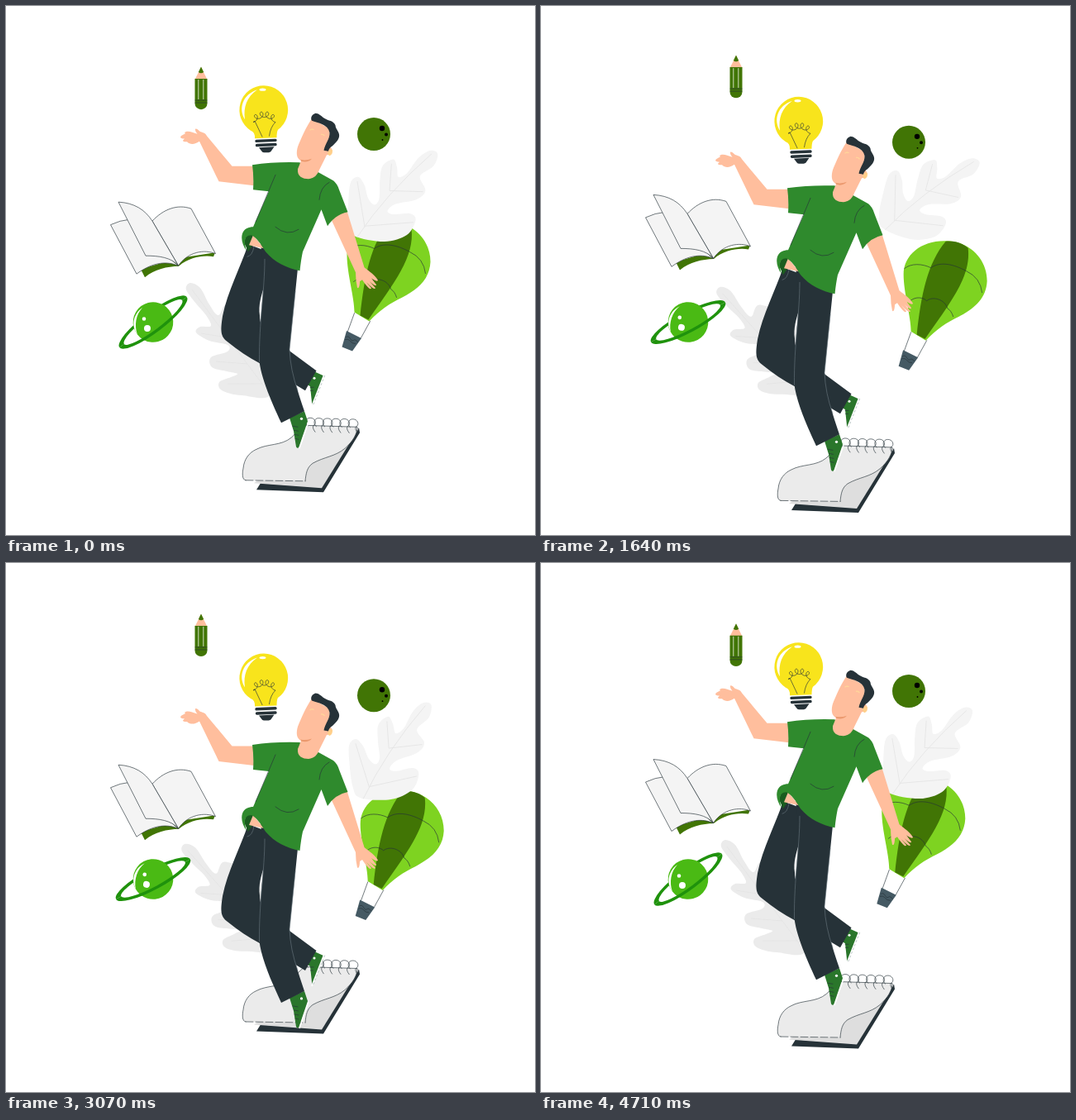
Animation of 640 by 640 pixels, one loop 4.78 s. Source, as an HTML page:

```html
<!DOCTYPE html>
<html lang="en">
<head>
<meta charset="utf-8">
<title>Floating ideas</title>
<style>
html, body { margin: 0; width: 100%; height: 100%; overflow: hidden; background: #fff; }
svg { display: block; width: 100vw; height: 100vh; }
.ln { fill: none; stroke: #263238; stroke-width: .65; stroke-linecap: round; stroke-linejoin: round; }
.pg { fill: #f4f4f4; stroke: #263238; stroke-width: .65; stroke-linejoin: round; }
.ink { fill: #263238; }
.skin { fill: #ffbe9d; }
.moss { fill: #417505; }
.shirt { fill: #2f8a2d; }
.shoe { fill: #2a762b; }
.ring { fill: #1f920c; }
.vein { fill: none; stroke: #e4e4e4; stroke-width: .8; }
.w { fill: #fff; }
</style>
</head>
<body>
<svg viewBox="0 0 640 640">
  <g id="leafL">
    <path id="leafLShape" fill="#ebebeb"/>
    <path class="vein" d="M225 343L312 460M268 457H310M236 396L268 401M254 430L292 433"/>
  </g>

  <g id="balloon">
    <path fill="#7ed321" d="M433 320C433 296 455 279 483 279.500C511 279 534 300 534 328C533 349 519 361 500 371C485 378 472 387 460 400L442 389C442 371 433 342 433 320Z"/>
    <path class="moss" d="M484 280C497 279 505 283 511 288C515 322 491 352 459 398L449 393C454 345 462 306 484 280Z"/>
    <path class="ln" d="M434 313C442 306 456 307 466 312C480 302 500 311 509 316Q526 324 528 342M441 352C448 346 457 348 461 352C468 346 483 350 486 361Q491 364 493 371M442 390L434 412M461 400L450 420"/>
    <path fill="#455a64" d="M432.500 411.500L450.500 420.500L439.500 436L427 431Z"/>
    <path class="ln" d="M432 419q3 -2 5 2t4 2t5 2M431 422q4 -1 6 2t6 3"/>
  </g>

  <g id="leafR">
    <path id="leafRShape" fill="#f4f4f4"/>
    <path class="vein" d="M418 273Q460 226 522 186M429 262L428 206M465 223L472 191M430 261L488 265M465 223L505 230"/>
  </g>

  <g id="pad">
    <path class="ink" d="M427 510L428 516L384 588L303 585L308 577L380 582Z"/>
    <path fill="#dedede" d="M425 509L426 512L382 583L300 577L310 570L360 540Z"/>
    <path fill="#ebebeb" d="M290 573.500C285 573 286 564 287 559C288 548 294 540 303 536C316 529 333 532 345 522L361 507L425 509C425 517 420 526 410 535C398 545 385 545 371 553C364 558 363 565 362 575Z"/>
    <path class="ln" d="M362 574.500C363 565 364 558 371 553C385 545 398 545 410 535C420 526 425 517 425 509L361 507L345 522C333 532 316 529 303 536C294 540 288 548 287 559C286 564 285 573 290 573.500"/>
    <path class="ln" stroke-dasharray="9 3" d="M290 573.500L362 574.500"/>
    <path class="ln" id="coil"/>
  </g>

  <g id="planet">
    <path class="ring" d="M-51 0A51 12.500 0 0 1 51 0H44A44 9 0 0 0 -44 0Z"/>
    <circle r="24.300" fill="#4aba14"/>
    <path class="ring" d="M-51 0A51 12.500 0 0 0 51 0H44A44 9 0 0 1 -44 0Z"/>
    <g class="w" transform="rotate(37)">
      <path d="M-13 -17.500C-24 -10 -27 4 -19 15C-23 4 -21 -9 -13 -17.500Z"/>
      <circle cx="-11" cy="-4" r="2.300"/>
      <circle cx="-7" cy="7.500" r="4"/>
    </g>
  </g>

  <g id="book">
    <path class="moss" d="M163 318L168 328C180 318 195 315 209 314.500C222 304 238 301 251 303L253 298L208 305Z"/>
    <path class="pg" d="M126.500 264.500Q138 259 150 258L208 314C192 307 174 312 158 324Z"/>
    <path class="pg" d="M177 260C190 246 207 239 224 245L253.500 299.500C240 294 220 297 208.500 314Z"/>
    <path class="pg" d="M136 237C155 238 168 246 177 260L208.500 314C200 304 185 302 169 302Z"/>
  </g>

  <g id="pencil">
    <path class="skin" d="M236 74L243.500 89H228.500Z"/>
    <path class="moss" d="M236 73.500L239.200 80Q236 82.500 232.800 80Z"/>
    <path class="moss" d="M228.500 88H243.500V118A7.500 7.200 0 0 1 228.500 118Z"/>
    <path d="M232.800 89V113M238.800 89V113" stroke="#dfe8d5" stroke-width=".9"/>
    <path class="ln" d="M229 114H243M229 117H243"/>
  </g>

  <g id="bulb">
    <path fill="#f8e41c" d="M312 96A29.600 29.600 0 0 1 329 149.500Q327.500 152 327.500 159L301 160Q301.500 152 296 150.500A29.600 29.600 0 0 1 312 96Z"/>
    <path class="w" d="M304 101C286 107 281 124 289 137C287 122 291 110 304 101Z"/>
    <ellipse class="w" cx="310.500" cy="101" rx="4" ry="1.700"/>
    <path class="ln" id="wire"/>
    <path d="M303 163.200L326 162.200M303.500 168.400L326 167.400" stroke="#263238" stroke-width="3.400" stroke-linecap="round"/>
    <path class="ink" d="M306 171L324.500 170L321 175Q320 177 316 177H312Q310 177 309 175Z"/>
  </g>

  <g id="ball">
    <circle class="moss" cx="445" cy="155" r="20"/>
    <circle cx="455" cy="148" r="3.200"/><circle cx="460" cy="155.500" r="2"/><circle cx="455.500" cy="162" r=".9"/>
  </g>

  <g id="man">
    <path class="shoe" d="M373 442L384 447L370.500 484L368 460L362 456Z"/>
    <path d="M384.500 447L370 484" stroke="#fff" stroke-width="1.800"/>
    <path class="ln" stroke-dasharray="2 3" style="stroke:#9aa" d="M385.500 447L371 484"/>
    <circle class="w" cx="373" cy="450" r="1.500"/>
    <path class="ln" d="M368 461h4M368.500 465h3"/>
    <path class="ink" d="M293 288C284 315 268 345 262 375C259 394 260 400 268 406C280 416 294 425 307 432L362 465L375.500 441L343 417C320 410 307 392 307 374C305 362 309 350 312 340L325 300Z"/>
    <path class="shoe" d="M343 498L361 490L365 502L354.500 533Q353 536 351 533L348 514Z"/>
    <path d="M366 503L355 535" stroke="#fff" stroke-width="1.500"/>
    <circle class="w" cx="357.500" cy="499" r="1.600"/>
    <path class="ln" d="M347 508l6 1M348.500 513l5 1M349 518l5 1M350 523l4 1"/>
    <path class="ink" d="M308 288L353 317L343 415C344 440 353 466 361 490L333 504C320 476 306 444 306 422C306 385 312 350 312 320Z"/>
    <path class="ln" style="stroke:#66757c" d="M313 306C313 345 306 380 306.500 430M350 345L343 415Q344 440 353 465M300 291Q298 302 292 303"/>
    <path class="skin" d="M299 193.500H273.500L243 157C241 152 236 153 234 151C232 148.500 229 147 228.800 149Q229 152 231.500 154.500C225 153 220 149.500 216 153L217 154L212 156.800Q209 160 216 160.300L214 162.500Q214 164 219 164C223 168 229 167 234 163.500L257.500 212L300 217Z"/>
    <path class="skin" d="M393 257C398 250 406 247 413 249L433.500 316C440 321 447 326 450 331.500C449 334 445 331 442 329L448 337C448 339 445 338 439 332L447 341C446 343 443 341 436 334L442 341C441 344 437 340 431 331L428 333C428 338 427 342 425 340.500Q423 332 423 322Z"/>
    <path fill="#1a5c1f" d="M299 275C290 275 288 281 289 288L293 297L302 284Z"/>
    <path class="skin" d="M299 277L294 289L312 293Z"/>
    <path class="shirt" d="M298 192Q325 188 355 189L378 201L396 211Q401 215 403 222L413.500 249Q398 252 389 266L381.500 246L359 297Q357 306 355.500 320C340 317 325 310 314 297C308 287 303 280 297 277C289 277 287 283 291 296C286 289 284 281 286 275C288 269 294 267 299 267L318 224L299 222Q300 207 298 192Z"/>
    <path class="ln" d="M326 204L302 261M379 234Q380 219 391 213M326 267Q340 279 354 270"/>
    <path class="skin" d="M370 136C363 146 357 160 353 170C351 177 351 184 357 187L353 197C352 206 359 209 366 209C373 208 377 204 379 198L388 180C394 180 396 174 393 171L391 148Z"/>
    <path fill="#eb996e" d="M356.500 185.500Q363 187 370 184.500Q365 190 357 187.500Z"/>
    <path fill="#ffcf8a" d="M389 178C390 173 395 171 395 175Q395 180 391 181Z"/>
    <path d="M367.500 150Q370 148 372.500 149.500M381 155Q384 154.500 385.500 157" fill="none" stroke="#ffd79a" stroke-width="1.200"/>
    <path class="ink" d="M374.500 129.500C370 131 368 135 370 138.500C377 141 390 143 391.500 153C392 161 386 166 384.500 174.500L390 175.500C391 171 394 170 396 168C400 164 404 160 403 155C402 150 399 149 398.500 144C396 138 390 139 385 135.500C381 132.500 378 129.500 374.500 129.500Z"/>
  </g>
</svg>
<script>
const LOOP = 4780, STEPS = 67, RAD = Math.PI / 180;
const $ = id => document.getElementById(id);
const shape = (id, d) => $(id).setAttribute('d', d);
const place = (id, v) => $(id).setAttribute('transform', v);
const shift = (id, x, y) => place(id, `translate(${x} ${y})`);

// Closed smooth outline through "x,y x,y ..." points.
function smooth(text) {
  const p = text.split(' ').map(s => s.split(',').map(Number)), n = p.length;
  const at = i => p[(i + n) % n];
  const pull = (i, k) => at(i).map((v, c) => v + k * (at(i + 1)[c] - at(i - 1)[c]) / 6);
  return 'M' + p[0] + p.map((_, i) => `C${pull(i, 1)} ${pull(i + 1, -1)} ${at(i + 1)}`).join('') + 'Z';
}

shape('leafLShape', smooth('218,343 223,335 235,341 246,361 257,374 270,361 310,390 322,467 285,471 261,465 258,455 272,449 280,445 267,442 249,437 248,425 268,418 268,410 246,405 230,395 235,388 248,387 242,374 230,360'));
shape('leafRShape', smooth('415,271 410,255 414,228 420,206 430,201 436,212 438,228 444,237 451,231 455,210 461,192 475,186 478,196 478,208 489,205 505,189 520,182 529,187 522,201 504,211 508,229 496,238 470,240 459,247 466,252 486,254 491,263 478,279 450,283'));

let coil = '';
for (let i = 0; i < 6; i++) coil += `M${365 + i * 10.3} ${508 + i * .3}c-4 -3 -3 -10 3 -10c7 0 8 8 4 9q-2 3 2 8`;
shape('coil', coil);

// Filament: four loops along a shallow arch, then the two legs.
let wire = 'M310 158L301 139';
for (let k = 0; k <= 96; k++) {
  const u = k / 96, a = u * 8 * Math.PI;
  wire += `L${299 + 27 * u + 3.4 * Math.sin(a)} ${137 - 6 * Math.sin(Math.PI * u) + 3.4 * Math.cos(a)}`;
}
shape('wire', wire + 'Q320 146 318.5 157');

// Sine of the loop plus its first overtone, which skews rise against fall.
const sway = (t, lag, mid, amp, skew = 0) => {
  const a = (360 * t / LOOP - lag) * RAD;
  return mid + amp * Math.sin(a) + skew * Math.sin(2 * a);
};

function draw(t) {
  const rise = sway(t, 86.5, .504, .496);
  const drift = sway(t, 66.6, .506, .499, .06);
  const swing = sway(t, 9.4, .06, .812, -.262);
  shift('man', 0, 35.3 * rise);
  shift('bulb', 0, 17.2 * rise);
  place('planet', `translate(178 382.5) rotate(${11 * rise - 37})`);
  place('leafL', `rotate(${-6.5 * rise} 274 405)`);
  shift('pencil', 0, 10 * Math.cos(720 * t / LOOP * RAD) - 10);
  shift('balloon', 26.8 * drift - 20.6, 23.8 * drift - 18.6);
  place('leafR', `rotate(${10.8 * swing - 8.4} 468 230)`);
  shift('pad', 0, 25 * swing);
  shift('ball', 0, sway(t, 61.7, 4.93, 4.24, 1.41));
  shift('book', 0, sway(t, 5.3, -.2, -7.75, 1.9));
}

const start = performance.now();
function tick() {
  const t = (performance.now() - start) % LOOP;
  const step = Math.floor(t / LOOP * STEPS + .05) % STEPS;
  draw(step * LOOP / STEPS);
  requestAnimationFrame(tick);
}
draw(0);
requestAnimationFrame(tick);
</script>
</body>
</html>
```
